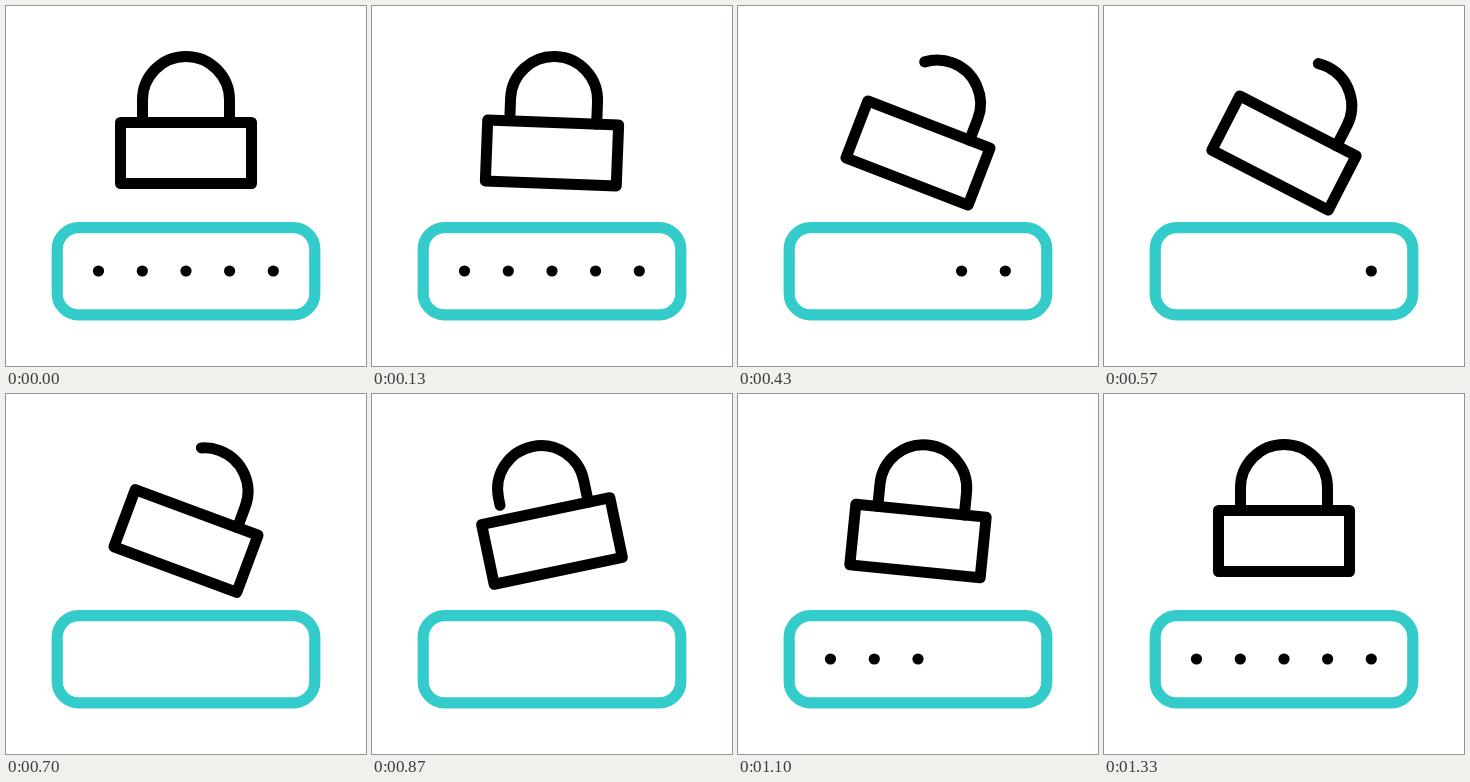
Recreate the animation shown at these times as an HTML page. Size 360 by 360 pixels, loop 2000 ms.

```html
<!DOCTYPE html>
<html lang="en">
<head>
<meta charset="utf-8">
<title>Password lock</title>
<style>
  html, body { margin: 0; width: 100%; height: 100%; overflow: hidden; background: #fff; }
  svg { display: block; width: 100%; height: 100%; }
</style>
</head>
<body>
<svg viewBox="0 0 360 360">
  <rect x="51.2" y="221.7" width="257.6" height="87.2" rx="21.5" fill="none" stroke="#33cccb" stroke-width="11.2"/>
  <g id="lock" fill="none" stroke="#000" stroke-width="11" stroke-linecap="round" stroke-linejoin="round">
    <path id="shackle" d="M136.5 116.5V94a43.5 43.5 0 0 1 87 0V116.5" pathLength="1" stroke-dasharray="1 2"/>
    <rect x="114.5" y="116.5" width="131" height="61"/>
  </g>
  <g id="dots">
    <circle cx="92.5" cy="265" r="5.6"/>
    <circle cx="136.3" cy="265" r="5.6"/>
    <circle cx="180" cy="265" r="5.6"/>
    <circle cx="223.6" cy="265" r="5.6"/>
    <circle cx="267.3" cy="265" r="5.6"/>
  </g>
</svg>
<script>
const LOOP = 2000, FPS = 30;
const lock = document.getElementById('lock');
const shackle = document.getElementById('shackle');
const dots = [...document.getElementById('dots').children];

// Keys are [tick, value]
const tiltKeys = [[0.9, 0], [18.8, 28], [26.8, -13], [33, 5.7], [40, 0]];
const openKeys = [[0.9, 0], [18.8, 0.455], [28.7, 0]];

function ease(keys, tick) {
  if (tick <= keys[0][0]) return keys[0][1];
  for (let i = 1; i < keys.length; i++) {
    const [t0, v0] = keys[i - 1], [t1, v1] = keys[i];
    if (tick < t1) {
      const u = (tick - t0) / (t1 - t0);
      return v0 + (v1 - v0) * u * u * (3 - 2 * u);
    }
  }
  return keys[keys.length - 1][1];
}

function draw() {
  const time = performance.now() % LOOP;
  const tick = Math.floor((time + 4) * FPS / 1000);
  lock.setAttribute('transform', `rotate(${ease(tiltKeys, tick)} 180 147)`);
  shackle.setAttribute('stroke-dashoffset', -ease(openKeys, tick));
  dots.forEach((dot, i) => {
    const hidden = tick >= 6 + 3 * i && tick < 27 + 3 * i;
    dot.setAttribute('visibility', hidden ? 'hidden' : 'visible');
  });
  requestAnimationFrame(draw);
}
draw();
</script>
</body>
</html>
```
